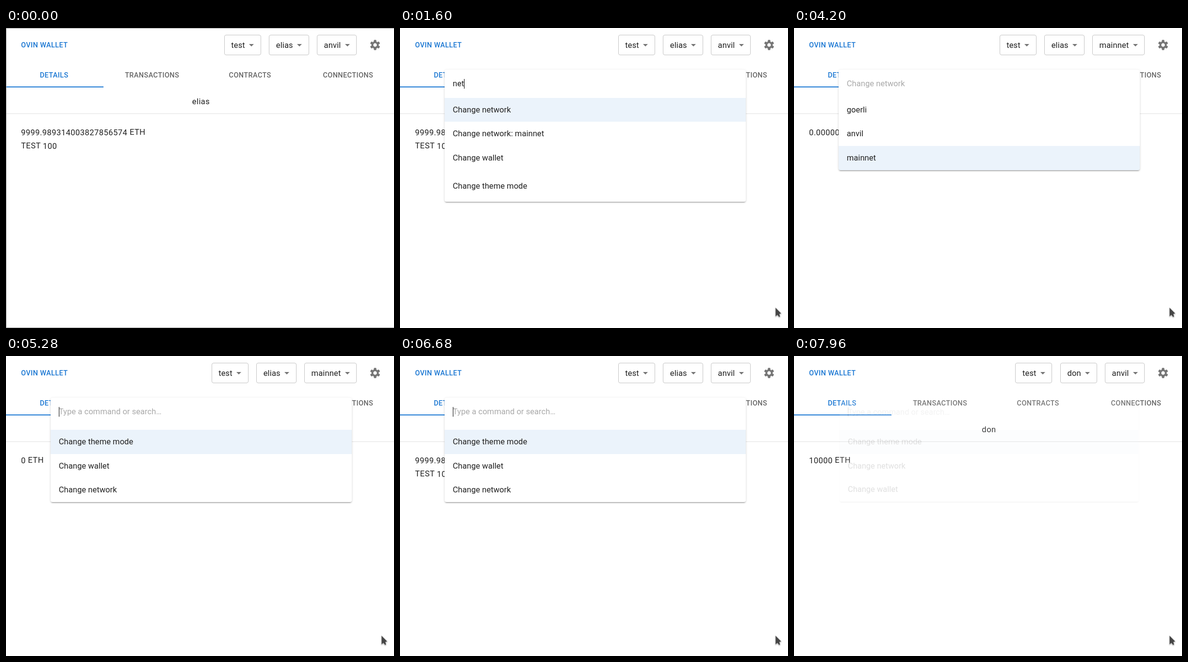
An HTML page that plays this animation: 800x618 px, repeating every 8 s.

```html
<!DOCTYPE html>
<html lang="en">
<head>
<meta charset="utf-8">
<title>Wallet command palette</title>
<style>
  html, body { margin: 0; width: 100%; height: 100%; overflow: hidden; background: #fff; }
  #stage {
    position: relative; width: 800px; height: 618px; overflow: hidden;
    font: 16.53px/24px Roboto, sans-serif; color: #212121; white-space: nowrap;
  }
  #stage > * { position: absolute; }
  .caps { font-size: 14.47px; font-weight: 500; letter-spacing: .413px; color: #666; }
  .caps.on { color: #1976d2; }
  .tab { top: 86px; transform: translateX(-50%); }
  .bar { left: 0; top: 120px; width: 200.5px; height: 2px; background: #1976d2; transform: translateY(.4px); }
  .rule { left: 0; top: 176px; width: 800px; height: 1px; background: #e0e0e0; }

  .selects { right: 76.7px; top: 14px; display: flex; gap: 16.5px; }
  .selects span {
    position: relative; box-sizing: border-box; height: 42px; padding: 0 31.8px 0 13.5px;
    border: 1px solid #c4c4c4; border-radius: 4px; line-height: 41px; letter-spacing: .155px;
  }
  .selects span::after {
    content: ""; position: absolute; right: 13.5px; top: 18px;
    border: 5.2px solid transparent; border-top-color: #757575; border-bottom: 0;
  }
  .gear { left: 749px; top: 23px; fill: #757575; }

  .wide { letter-spacing: .47px; }
  #owner { left: 402px; top: 140px; transform: translateX(-50%); }
  #coins { left: 31px; top: 203px; }
  #token { left: 31px; top: 231px; }
  .wide b { font-weight: 400; position: relative; top: 1px; }

  #panel {
    left: 92px; top: 85.8px; width: 620.5px; overflow: hidden; border-radius: 4px; background: #fff;
    letter-spacing: .05px;
    box-shadow: 0 3px 1px -2px rgba(0,0,0,.2), 0 2px 2px rgba(0,0,0,.14), 0 1px 5px rgba(0,0,0,.12);
  }
  #field { position: relative; height: 57.9px; padding-left: 16.8px; line-height: 57.9px; }
  #field i { font-style: normal; color: #a9a9a9; }
  #caret { position: absolute; top: 19px; width: 1px; height: 20px; background: #000; }
  .row { height: 49.6px; padding-left: 16.8px; line-height: 49.6px; }
  .row.gap { margin-top: 8.3px; }
  #pointer { left: 0; top: 0; overflow: visible; filter: drop-shadow(0 1px 1px rgba(0,0,0,.35)); }
  #frame { inset: 0; border: 1px solid #999; border-right: 0; }
</style>
</head>
<body>
<div id="stage">
  <div class="caps on" style="left:31px;top:24px">OVIN WALLET</div>
  <div class="selects"><span>test</span><span id="wallet"></span><span id="network"></span></div>
  <svg class="gear" width="24" height="24" viewBox="-12 -12 24 24">
    <circle r="5.55" fill="none" stroke="#757575" stroke-width="3.7"/>
    <path id="tooth" d="M-2.9-6.8L-2.4-10Q-2.3-10.4-1.9-10.4H1.9Q2.3-10.4 2.4-10L2.9-6.8Z"/>
    <use href="#tooth" transform="rotate(60)"/><use href="#tooth" transform="rotate(120)"/>
    <use href="#tooth" transform="rotate(180)"/><use href="#tooth" transform="rotate(240)"/>
    <use href="#tooth" transform="rotate(300)"/>
  </svg>
  <div class="caps tab on" style="left:99.2px">DETAILS</div>
  <div class="caps tab" style="left:301.2px">TRANSACTIONS</div>
  <div class="caps tab" style="left:503.2px">CONTRACTS</div>
  <div class="caps tab" style="left:705.3px">CONNECTIONS</div>
  <div class="bar"></div>
  <div class="wide" id="owner"></div>
  <div class="rule"></div>
  <div class="wide" id="coins"><b id="amount"></b> ETH</div>
  <div class="wide" id="token">TEST <b>100</b></div>
  <div id="panel">
    <div id="field"><span id="typed"></span><span id="caret"></span><i id="hint"></i></div>
    <div id="rows"></div>
  </div>
  <svg id="pointer" width="14" height="22">
    <path d="M.4 0V18.9L4.4 15.6L7.9 19.9L10.2 18.7L8.8 13.6L12.6 12.4Z" fill="#454545" stroke="#fff" stroke-width=".5"/>
  </svg>
  <div id="frame"></div>
</div>
<script>
const LOOP = 8000, ROW = 49.6, GAP = 8.3, FIELD = 57.9;
const $ = id => document.getElementById(id);

const labels = {
  n: 'Change network', m: 'Change network: mainnet', a: 'Change network: anvil',
  w: 'Change wallet', t: 'Change theme mode',
  1: 'goerli', 2: 'anvil', 3: 'mainnet', 4: 'elias', 5: 'don'
};
const ASK = 'Type a command or search…', full = '9999.989314003827856574';
const zeros = '.' + '0'.repeat(18);

// time, wallet, network, balance
const pages = [
  [0, 'elias', 'anvil', full],
  [4200, 'elias', 'mainnet', '0' + zeros],
  [4680, 'elias', 'mainnet', '0'],
  [6080, 'elias', 'anvil', full],
  [7400, 'don', 'anvil', '10000' + zeros],
  [7760, 'don', 'anvil', '10000']
];
// time, typed text, placeholder, rows, active row
const steps = [
  [0, '', ASK, 'twn', 0],
  [1380, 'n', ASK, 'twn', 0],
  [1400, 'n', ASK, 'nmawt', 0],
  [1515, 'ne', ASK, 'nmawt', 0],
  [1535, 'ne', ASK, 'nmwt', 0],
  [1600, 'net', ASK, 'nmwt', 0],
  [1640, 'net', ASK, 'nmt', 0],
  [2680, '', labels.n, 'nmt', 0],
  [2720, '', labels.n, '123', 0],
  [3720, '', labels.n, '123', 1],
  [3880, '', labels.n, '123', 2],
  [4500, '', ASK, 'twn', 0],
  [5320, 'a', ASK, 'twn', 0],
  [5340, 'a', ASK, 'nmawt', 0],
  [5460, 'an', ASK, 'anmwt', 0],
  [5600, 'anv', ASK, 'anmwt', 0],
  [5640, 'anv', ASK, 'a', 0],
  [6300, '', ASK, 'twn', 0],
  [6680, '', ASK, 'twn', 1],
  [6720, '', labels.w, '45', 0],
  [6820, '', labels.w, '45', 1],
  [7700, '', ASK, 'tnw', 0]
];
const shows = [[1065, 4200], [4800, 6080], [6425, 7400], [7953, 9000]];
const caretOff = [[2160, 2680], [3280, 3720], [4200, 4400]];
const bumps = [2720, 6720];

const ratio = (t, from, ms) => Math.min(1, Math.max(0, (t - from) / ms));
const easeIn = p => p ** 1.7;
const easeOut = p => 1 - (1 - p) ** 1.7;
const within = (t, spans) => spans.find(([a, b]) => t >= a && t < b);
const lastIndex = (list, t) => list.findLastIndex(s => s[0] <= t);
const heightOf = rows => FIELD + rows.length * ROW + (rows.includes('t') ? GAP : 0);

let shownPage = -1, shownStep = -1;

function drawPage(t) {
  const i = lastIndex(pages, t);
  if (i === shownPage) return;
  shownPage = i;
  const [, wallet, network, balance] = pages[i];
  $('wallet').textContent = $('owner').textContent = wallet;
  $('network').textContent = network;
  $('amount').textContent = balance;
  $('token').hidden = balance !== full;
}

function fillPanel([, typed, hint, rows]) {
  $('typed').textContent = typed;
  $('hint').textContent = typed ? '' : hint;
  $('rows').innerHTML = [...rows].map(r =>
    `<div class="row${r === 't' ? ' gap' : ''}">${labels[r]}</div>`).join('');
}

// Eases from the previous list's height, counted from when the list last changed.
function panelHeight(t, i) {
  while (i > 0 && steps[i - 1][3] === steps[i][3]) i--;
  const to = heightOf(steps[i][3]), from = i ? heightOf(steps[i - 1][3]) : to;
  return from + (to - from) * easeOut(ratio(t, steps[i][0], 100));
}

function drawPanel(t) {
  const panel = $('panel'), span = shows.find(([a, b]) => t >= a && t < b + 100);
  panel.style.visibility = span ? 'visible' : 'hidden';
  if (!span) return;

  const i = lastIndex(steps, t), step = steps[i], prev = steps[Math.max(0, i - 1)];
  if (i !== shownStep) {
    fillPanel(step);
    shownStep = i;
  }
  panel.style.height = panelHeight(t, i) + 'px';

  const fade = step[3] === prev[3] ? ratio(t, step[0], 100) : 1;
  [...$('rows').children].forEach((row, k) => {
    const level = (k === step[4]) * fade + (k === prev[4]) * (1 - fade);
    row.style.background = `rgba(25,118,210,${0.087 * level})`;
  });

  const [open, close] = span;
  const q = t < close ? easeOut(ratio(t, open, 200)) : 1 - easeIn(ratio(t, close, 100));
  let scale = q < .5 ? .99 + .04 * q : 1.02 - .02 * q;
  for (const b of bumps) scale -= .02 * (1 - Math.abs(2 * easeOut(ratio(t, b, 200)) - 1));
  panel.style.opacity = Math.min(1, 2 * q);
  panel.style.transform = Math.abs(scale - 1) < 1e-6 ? 'none' : `scale(${scale})`;
  $('caret').style.visibility = within(t, caretOff) ? 'hidden' : 'inherit';
}

function drawPointer(t) {
  const left = 1 - easeOut(ratio(t, 460, 300));
  $('pointer').style.transform = `translate(${773.7 + 28 * left}px, ${575.7 + 43 * left}px)`;
}

function draw() {
  const t = performance.now() % LOOP;
  drawPage(t);
  drawPanel(t);
  drawPointer(t);
  $('frame').style.opacity = 1 - ratio(t, 20, 240);
  requestAnimationFrame(draw);
}
draw();
</script>
</body>
</html>
```
